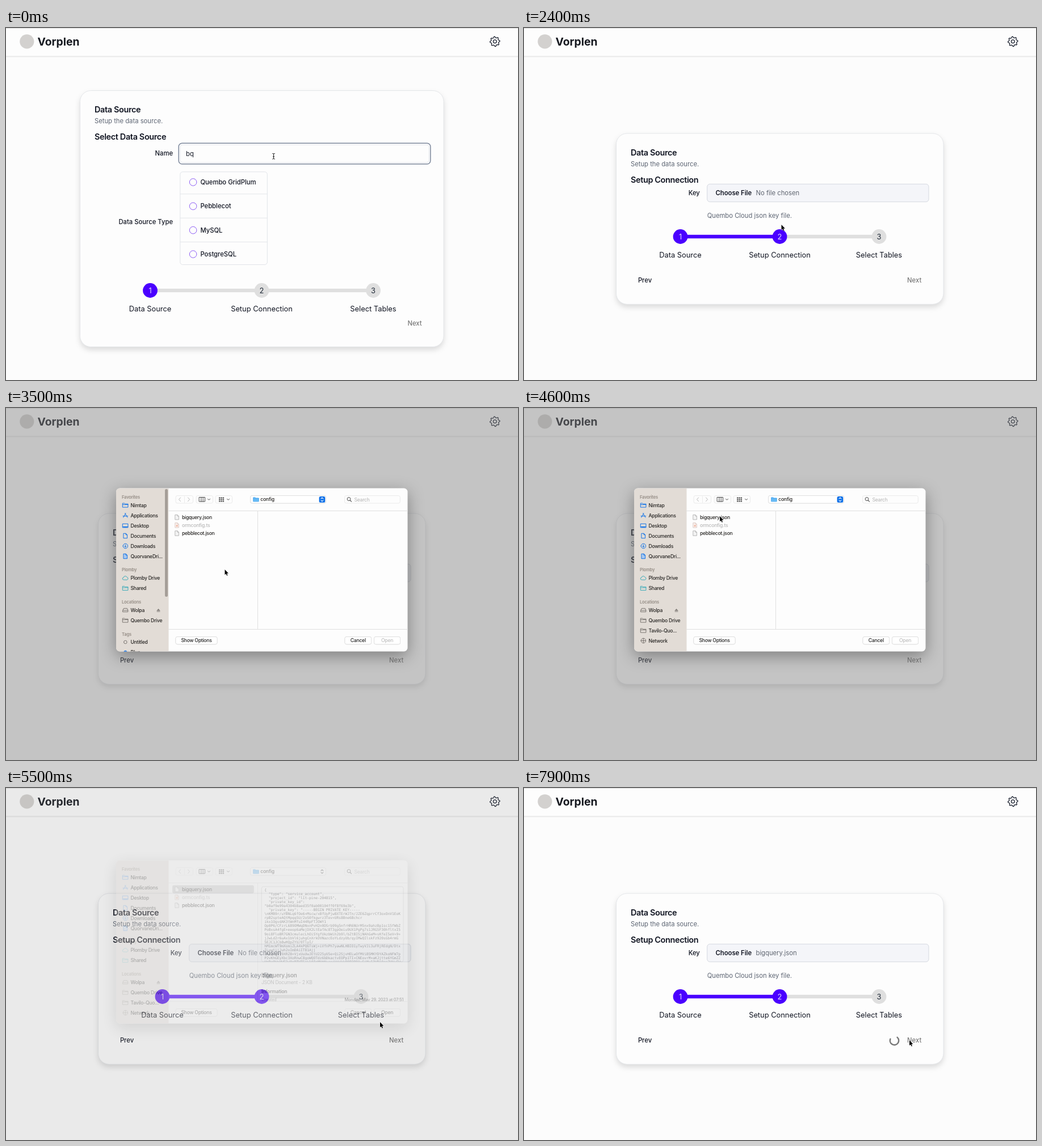
An HTML page that plays this animation: 902 by 621 pixels, repeating every 8000 ms.

```html
<!DOCTYPE html>
<html lang="en">
<head>
<meta charset="utf-8">
<title>Data source setup</title>
<style>
html, body { margin: 0; width: 100%; height: 100%; overflow: hidden; background: #fcfcfc; }
svg { display: block; width: 902px; height: 621px; font-family: Inter, "Open Sans", sans-serif; }
text { white-space: pre; }
.card { fill: #fdfdfd; stroke: #e4e6e9; filter: drop-shadow(0 5px 5px rgba(0,0,0,.13)); }
.sheet { filter: drop-shadow(0 8px 14px rgba(0,0,0,.35)); }
.btn { fill: #fff; stroke: #dcdcdc; stroke-width: .7; filter: drop-shadow(0 .5px .4px rgba(0,0,0,.2)); }
.code { font-family: "DejaVu Sans Mono", "Liberation Mono", monospace; }
.line { fill: none; stroke-linecap: round; stroke-linejoin: round; }
</style>
</head>
<body>
<svg id="stage" viewBox="0 0 902 621"></svg>
<script>
const INK = '#111522', MUTED = '#5d6573', OFF = '#777', PURPLE = '#4a00ff', BASE = '#dfdfdf', BLUE = '#0a6fe8';
const LOOP = 8000, STEP = 100;

// y is the middle of the capitals
function text(x, y, str, size, { w = 400, c = INK, a = 'start', ls = 0, id = '', cls = '' } = {}) {
  return `<text id="${id}" class="${cls}" x="${x}" y="${(y + size * .363).toFixed(2)}" font-size="${size}" ` +
    `font-weight="${w}" fill="${c}" text-anchor="${a}" letter-spacing="${ls}">${str}</text>`;
}
const rect = (x, y, x2, y2, r, attr) =>
  `<rect x="${x}" y="${y}" width="${x2 - x}" height="${y2 - y}" rx="${r}" ${attr}/>`;
const path = (d, c, w = 1, attr = '') => `<path class="line" d="${d}" stroke="${c}" stroke-width="${w}" ${attr}/>`;
const circle = (x, y, r, attr) => `<circle cx="${x}" cy="${y}" r="${r}" ${attr}/>`;
const group = (id, body, attr = '') => `<g id="${id}" ${attr}>${body}</g>`;

const title = (x, y, s) => text(x, y, s, 14.45, { w: 600, ls: '-.025em' });
const label = (x, y, s, o = {}) => text(x, y, s, 11.25, { w: 500, ...o });

function gear(cx, cy) {
  let d = '';
  for (let i = 0; i < 32; i++) {
    const r = i % 4 < 2 ? 8.7 : 6.7, a = (i + .5 + (i % 2 ? -.15 : .15)) * Math.PI / 16 - .3;
    d += (i ? 'L' : 'M') + (cx + r * Math.cos(a)).toFixed(2) + ' ' + (cy + r * Math.sin(a)).toFixed(2);
  }
  return path(d + 'Z', '#1c2230', 1.3) + circle(cx, cy, 2.9, 'fill="none" stroke="#1c2230" stroke-width="1.3"');
}

function steps(xs, y, done) {
  const names = ['Data Source', 'Setup Connection', 'Select Tables'];
  let s = '';
  for (let i = 1; i < 3; i++)
    s += rect(xs[i - 1], y - 3.2, xs[i], y + 3.2, 0, `fill="${i < done ? PURPLE : BASE}"`);
  return s + xs.map((x, i) =>
    circle(x, y, 12.9, `fill="${i < done ? PURPLE : BASE}"`) +
    text(x, y, i + 1, 12.85, { a: 'middle', c: i < done ? '#e4dcff' : '#1f2937' }) +
    text(x, y + 32.2, names[i], 12.85, { a: 'middle' })).join('');
}

const header =
  rect(0, 0, 902, 50, 0, 'fill="#fdfdfd"') +
  rect(0, 0, 902, 1, 0, 'fill="#dcdcdc"') +
  rect(0, 49.5, 902, 50.7, 0, 'fill="#dfdfe0"') + rect(0, 50.7, 902, 52, 0, 'fill="#f5f5f5"') +
  circle(36.8, 23.8, 12.6, 'fill="#d3d1cf"') +
  text(55.5, 24, 'Vorplen', 19.3, { w: 700, c: '#15181f' }) + gear(861.3, 23.8);

function formOne() {
  const kinds = ['Quembo GridPlum', 'Pebblecot', 'MySQL', 'PostgreSQL'];
  const rows = kinds.map((k, i) => {
    const y = 272 + i * 42.35;
    return (i ? rect(306.5, y - 22, 460.5, y - 21, 0, 'fill="#e4e6ea"') : '') +
      circle(329.6, y, 6.3, 'fill="#fdfdfd" stroke="#8c5cf5" stroke-width="1"') +
      label(342.4, y, k);
  }).join('');
  return rect(130.5, 110.5, 771, 562.5, 19, 'class="card"') +
    title(156, 143.6, 'Data Source') + text(156, 163.6, 'Setup the data source.', 11.25, { c: MUTED }) +
    title(156, 191.9, 'Select Data Source') + label(294, 221.4, 'Name', { a: 'end' }) +
    rect(306.8, 206, 745.3, 237.3, 4.5, 'fill="#fdfdfd" stroke="#e1e4ea"') +
    rect(304.2, 203.3, 747.8, 240, 6, 'id="ring" fill="none" stroke="#7d889c" stroke-width="1.5"') +
    text(317, 221.8, 'bq', 11.25) +
    label(294, 342.3, 'Data Source Type', { a: 'end' }) +
    rect(306.8, 253.8, 460.3, 417.5, 4.5, 'fill="#fdfdfd" stroke="#e1e4e9"') + rows +
    group('picked', circle(329.6, 272, 6.3, `fill="#fdfdfd" stroke="${PURPLE}"`) + circle(329.6, 272, 3.2, `fill="${PURPLE}"`)) +
    steps([254, 450.5, 647], 463, 1) + label(720, 521, 'Next', { a: 'middle', id: 'next1' });
}

function formTwo() {
  return rect(162.5, 186, 739, 487.3, 19, 'class="card"') +
    title(188, 219.4, 'Data Source') + text(188, 239.6, 'Setup the data source.', 11.25, { c: MUTED }) +
    title(188, 267.7, 'Setup Connection') + label(309.8, 291, 'Key', { a: 'end' }) +
    rect(322.7, 275.3, 713, 306.7, 4.8, 'fill="#f4f5f9" stroke="#d5d9e0"') +
    label(337.5, 291, 'Choose File', { w: 600 }) +
    text(408.5, 291.2, '', 11.25, { c: '#5f6570', id: 'file' }) +
    text(322.7, 331.2, 'Quembo Cloud json key file.', 11.25, { c: MUTED }) +
    steps([275.5, 450.5, 625.5], 368, 2) +
    label(213, 445.3, 'Prev', { a: 'middle' }) + label(687.7, 445.3, 'Next', { a: 'middle', id: 'next2' }) +
    group('spin', circle(0, 0, 9.5, `id="arc" class="line" stroke="${OFF}" stroke-width="3"`));
}

// small icons drawn around 0,0
const glyphs = {
  folder: 'M-4.6 -3.4H-1.5L-.6 -2.3H4.6V3.6H-4.6ZM-4.6 -1H4.6',
  apps: 'M-3.6 3.6L.6 -3.8M3.6 3.6L-.6 -3.8M-4.4 1.2H4.4',
  desktop: 'M-4.6 -3.2H4.6V3.4H-4.6ZM-4.4 1.9H4.4M-2.6 2.6H2.6',
  doc: 'M-3 -4.2H.8L3.2 -1.8V4.2H-3ZM.8 -4.2V-1.8H3.2',
  down: 'M-4.2 0a4.2 4.2 0 1 0 8.4 0a4.2 4.2 0 1 0 -8.4 0M0 -2.2V2M-1.7 .4L0 2L1.7 .4',
  cloud: 'M-3 3.1a2 2 0 0 1 -.2 -4a3.1 3.1 0 0 1 5.9 -.6a2.4 2.4 0 0 1 .4 4.6Z',
  drive: 'M-4.5 .5L-3 -3H3L4.5 .5V3.2H-4.5ZM-4.5 .5H4.5',
  tag: 'M-2.8 0a2.8 2.8 0 1 0 5.6 0a2.8 2.8 0 1 0 -5.6 0',
  globe: 'M-4.2 0a4.2 4.2 0 1 0 8.4 0a4.2 4.2 0 1 0 -8.4 0M-4.2 0H4.2M0 -4.2V4.2'
};
const icon = (x, y, name, c, fill = 'none') =>
  path(glyphs[name], c, .95, `transform="translate(${x} ${y})" style="fill:${fill}"`);
const small = (x, y, s, o = {}) => text(x, y, s, 8.6, { w: 500, c: '#262422', ls: -.25, ...o });
const head = (y, s) => text(204, y, s, 7.5, { w: 600, c: '#948c85', ls: -.15 });
const place = (y, name, s, c, fill) => group('', icon(210.3, y, name, c, fill), 'class="mark"') + small(219.5, y, s);

function sidebar() {
  const teal = '#35a9b8', grey = '#75706c';
  return rect(194, 141.5, 286.5, 429.5, 0, 'fill="#e2dcd6"') +
    head(157, 'Favorites') +
    [['folder', 'Nimtap'], ['apps', 'Applications'], ['desktop', 'Desktop'], ['doc', 'Documents'],
     ['down', 'Downloads'], ['doc', 'QuorvaneDri...', '#a9c8ee']]
      .map(([g, s, f], i) => place(171.5 + i * 18, g, s, BLUE, f)).join('') +
    head(285.5, 'Plomby') + place(300, 'cloud', 'Plomby Drive', teal) + place(318, 'folder', 'Shared', teal) +
    head(342, 'Locations') + place(356.5, 'drive', 'Wolpa', grey) +
    path('M266 357.5L268.5 354.5L271 357.5ZM266 359.3H271', grey, .7, 'style="fill:#8a8580"') +
    place(374.5, 'folder', 'Quembo Drive', grey) +
    group('tags', head(399, 'Tags') + place(413, 'tag', 'Untitled', grey) + place(431, 'tag', 'Blue', BLUE, BLUE)) +
    group('net', place(392.5, 'folder', 'Tavilo-Quo...', grey) + place(410.5, 'globe', 'Network', grey)) +
    rect(280, 143, 285, 333, 2.5, 'id="bar" fill="#a59e98"');
}

const button = (x, x2, s, id, c = '#222') =>
  rect(x, 403.6, x2, 416.8, 3, `class="btn" id="${id}Box"`) + small((x + x2) / 2, 410, s, { a: 'middle', c, id });

function toolbar() {
  const c = '#4a4a4a', field = 'fill="#fdfdfd" stroke="#e6e6e6" stroke-width=".8"';
  let s = rect(299, 154.6, 329.5, 168, 3, field) + rect(335, 154.6, 364.5, 168, 3, field) + rect(369, 154.6, 398.5, 168, 3, field) +
    path('M307.5 158L304.5 161.3L307.5 164.6M320.5 158L323.5 161.3L320.5 164.6', '#b9b9b9', 1) + path('M314.5 156V167', '#e2e2e2', .7) +
    path('M340.5 157.5H350.5V165H340.5ZM343.8 157.5V165M347.2 157.5V165M355.5 160.3L357.5 162.3L359.5 160.3M389.5 160.3L391.5 162.3L393.5 160.3', c, 1);
  for (let i = 0; i < 9; i++) s += rect(375 + i % 3 * 3.3, 157.5 + (i / 3 | 0) * 3, 377.5 + i % 3 * 3.3, 159.6 + (i / 3 | 0) * 3, .4, `fill="${c}"`);
  return s + rect(430.5, 154.6, 563.5, 168, 3, 'class="btn"') +
    icon(440.6, 161.3, 'folder', '#4eaaf0', '#6abdf6') + small(448.2, 161, 'config') +
    rect(551.6, 156, 562.2, 166.8, 2.6, `id="knob" fill="${BLUE}"`) +
    path('M555 160L556.9 158.2L558.8 160M555 162.8L556.9 164.6L558.8 162.8', '#fff', 1.1, 'id="knobArrows"') +
    rect(596.5, 154.6, 694.3, 168, 3, field) +
    circle(604, 160.6, 2.9, `fill="none" stroke="${c}"`) + path('M606.2 162.8L608.5 165.2', c, 1.1) +
    small(613.5, 161.4, 'Search', { w: 400, c: '#b2b2b2' });
}

function keyLines() {
  let seed = 29;
  const rnd = n => (seed = (seed * 16807) % 2147483647) % n;
  const pick = (set, n) => Array.from({ length: n }, () => set[rnd(set.length)]).join('');
  const b64 = 'ABCDEFGHIJKLMNOPQRSTUVWXYZabcdefghijklmnopqrstuvwxyz0123456789+/';
  const body = [62, 46, 29, 64, 64, 64, 63, 23, 64, 24, 64, 64, 64, 64];
  return ['{', '  "type": "service_account",', '  "project_id": "lit-pine-204815",', '  "private_key_id":',
    `"${pick('0123456789abcdef', 40)}",`, '  "private_key": "-----BEGIN PRIVATE KEY-----',
    ...body.map((n, i) => (i ? '' : '\\n') + pick(b64, n))];
}

function preview() {
  return rect(450.3, 188, 700, 320.6, 3, 'fill="#fff" stroke="#c6c6c6" stroke-width=".8"') +
    group('', keyLines().map((s, i) => text(455.3, 193.4 + i * 7.08, s, 6.23, { cls: 'code', c: '#1a1a1a' })).join(''), 'clip-path="url(#keyClip)"') +
    text(450, 344, 'bigquery.json', 9.8, { w: 600, c: '#222', ls: -.2 }) +
    small(450, 357.2, 'JSON Document - 2 KB', { w: 400, c: '#777', ls: -.3 }) +
    small(450, 372.6, 'Information', { w: 600 }) +
    group('', text(450, 387.2, 'Created', 7.3, { c: '#777', ls: -.1 }) +
      text(700, 387.2, 'Monday, May 29, 2023 at 07:51', 7.3, { w: 500, c: '#222', a: 'end', ls: -.18 }), 'clip-path="url(#infoClip)"');
}

function dialog() {
  const page = (y, c, f) => icon(301.2, y, 'doc', c, f);
  return group('', rect(194, 141.5, 707.5, 429.5, 6.5, 'fill="#fdfdfd"'), 'class="sheet"') +
    group('', sidebar(), 'clip-path="url(#sheetClip)"') + toolbar() +
    path('M286.5 181.5H707.5M286.5 390.5H707.5M443.5 181.5V390.5', '#e0e0e0', 1) +
    rect(293, 185.6, 436.8, 199.8, 3, 'id="row"') +
    page(192.7, '#b4b4b4', '#f3f3f3') + small(310, 192.5, 'bigquery.json', { id: 'rowText' }) +
    page(206.8, '#dccac4', '#fbefea') + circle(301.2, 207.8, 1.5, 'fill="#edb29c"') + small(310, 206.7, 'ormconfig.ts', { c: '#b8b8b8' }) +
    page(221, '#b4b4b4', '#f3f3f3') + small(310, 220.8, 'pebblecot.json') +
    group('preview', preview()) +
    button(299, 372, 'Show Options', 'show') + button(597, 643.6, 'Cancel', 'cancel') + button(648.5, 694.6, 'Open', 'open');
}

const pointers = {
  arrow: path('M0 0V9.3L2.1 7.4L3.6 10.8L5 10.2L3.5 6.8H6.4Z', '#fff', .9, 'style="fill:#000;paint-order:stroke"'),
  hand: path('M-1.2 0a1.1 1.1 0 0 1 2.2 0V3.4L4.6 4.2Q6 4.6 5.8 6L5 10.5H-.6L-3.8 6.3Q-3.6 4.9 -2.2 5.5L-1.2 6.3Z', '#000', .9, 'style="fill:#fff"'),
  beam: path('M-1.9 -4.6Q0 -4.6 0 -3.6Q0 -4.6 1.9 -4.6M0 -4V4.6M-1.9 5.2Q0 5.2 0 4.2Q0 5.2 1.9 5.2M-1.2 .9H1.2', '#222', 1),
  none: ''
};

document.getElementById('stage').innerHTML =
  `<defs><clipPath id="sheetClip">${rect(194, 141.5, 707.5, 429.5, 6.5, '')}</clipPath>
  <clipPath id="keyClip">${rect(451, 188.5, 699.5, 320, 0, '')}</clipPath>
  <clipPath id="infoClip">${rect(445, 380, 705, 390, 0, '')}</clipPath></defs>` +
  rect(0, 0, 902, 621, 0, 'fill="#fcfcfc"') + header +
  group('one', formOne()) + group('two', formTwo()) +
  rect(0, 0, 902, 621, 0, 'id="dim" fill="#7f7f7f"') + group('dialog', dialog()) +
  Object.keys(pointers).map(k => group(k, pointers[k])).join('');

const $ = id => document.getElementById(id);
const show = (id, on) => $(id).setAttribute('visibility', on ? 'inherit' : 'hidden');
const set = (id, name, v) => $(id).setAttribute(name, v);

// time, x, y, pointer from here on
const route = [
  [0, 471.5, 226, 'beam'], [300, 420, 243, 'arrow'], [500, 348, 271, 'hand'], [700, 346, 270, 'hand'],
  [800, 400, 310, 'arrow'], [1000, 600, 470, 'arrow'], [1300, 730, 534, 'hand'], [1800, 720, 521, 'hand'],
  [2000, 720, 521, 'arrow'], [2400, 453.5, 347, 'arrow'], [2800, 374, 289, 'arrow'], [3200, 374, 289, 'none'],
  [3500, 385.5, 285, 'arrow'], [3800, 385.5, 285, 'arrow'], [4500, 345, 191, 'arrow'], [4700, 345, 191, 'arrow'],
  [5100, 659, 413, 'arrow'], [5900, 659, 413, 'arrow'], [6400, 671, 443, 'hand'], [6500, 679, 445, 'hand'],
  [6700, 679, 445, 'arrow'], [LOOP, 679, 445, 'arrow']
];
// time, sheet opacity, sheet offset, dim
const sheet = [
  [3200, 0, -26, 0], [3300, .4, -18.6, .104], [3400, .85, -6, .29], [3500, 1, 0, .45],
  [5300, 1, 0, .45], [5400, .84, -2.6, .36], [5500, .3, -14, .15], [5600, 0, -20, 0]
];

function at(table, t, ease = x => x) {
  if (t <= table[0][0]) return table[0];
  const i = table.findIndex(r => r[0] > t);
  if (i < 0) return table[table.length - 1];
  const a = table[i - 1], b = table[i], k = ease((t - a[0]) / (b[0] - a[0]));
  return a.map((v, j) => typeof v === 'number' ? v + (b[j] - v) * k : v);
}
const smooth = x => x * x * (3 - 2 * x);

function draw(t) {
  show('one', t < 2000);
  show('two', t >= 2000);
  show('ring', t < 700);
  show('picked', t >= 700);
  set('next1', 'fill', t < 700 ? OFF : INK);
  set('next2', 'fill', t >= 5700 && t < 6700 ? INK : OFF);
  $('file').textContent = t < 5700 ? 'No file chosen' : 'bigquery.json';

  const [, alpha, dy, dim] = at(sheet, t);
  const chosen = t >= 4700, active = t < 5300;
  set('dim', 'opacity', dim);
  show('dialog', alpha > 0);
  set('dialog', 'opacity', alpha);
  set('dialog', 'transform', `translate(0 ${dy})`);
  $('dialog').style.filter = alpha < 1 ? 'brightness(.96)' : 'none';
  show('tags', t < 4000);
  show('net', t >= 4000);
  set('bar', 'opacity', t < 3500 ? 0 : Math.max(0, Math.min(1, (4200 - t) / 300)));
  show('row', chosen);
  show('preview', chosen);
  set('row', 'fill', active ? '#0b62dc' : '#cacaca');
  set('rowText', 'fill', chosen && active ? '#fff' : '#262422');
  $('openBox').style.fill = chosen && active ? BLUE : '#fff';
  set('open', 'fill', !chosen ? '#bdbdbd' : active ? '#fff' : '#222');
  set('knob', 'fill', active ? BLUE : '#fff');
  set('knobArrows', 'stroke', active ? '#fff' : '#333');
  document.querySelectorAll('.mark').forEach(m => m.setAttribute('opacity', active ? 1 : .6));

  show('spin', t >= 6700);
  if (t >= 6700) {
    const u = (t - 7900) / 1000 + 5.2;
    const [, len, off] = at([[0, 0, 0], [.475, 42, -16], [.95, 42, -59], [1, 59, -59]], u / 1.5 % 1);
    set('spin', 'transform', `translate(652.5 445.6) scale(.81) rotate(${u * 180})`);
    set('arc', 'stroke-dasharray', `${len} 150`);
    set('arc', 'stroke-dashoffset', off);
  }

  const [, x, y, kind] = at(route, t, smooth);
  for (const k in pointers) show(k, k === kind);
  set(kind, 'transform', `translate(${x} ${y})`);
}

const start = performance.now();
function tick() {
  const t = (performance.now() - start) % LOOP;
  draw(Math.floor(t / STEP) * STEP);
  requestAnimationFrame(tick);
}
tick();
</script>
</body>
</html>
```
